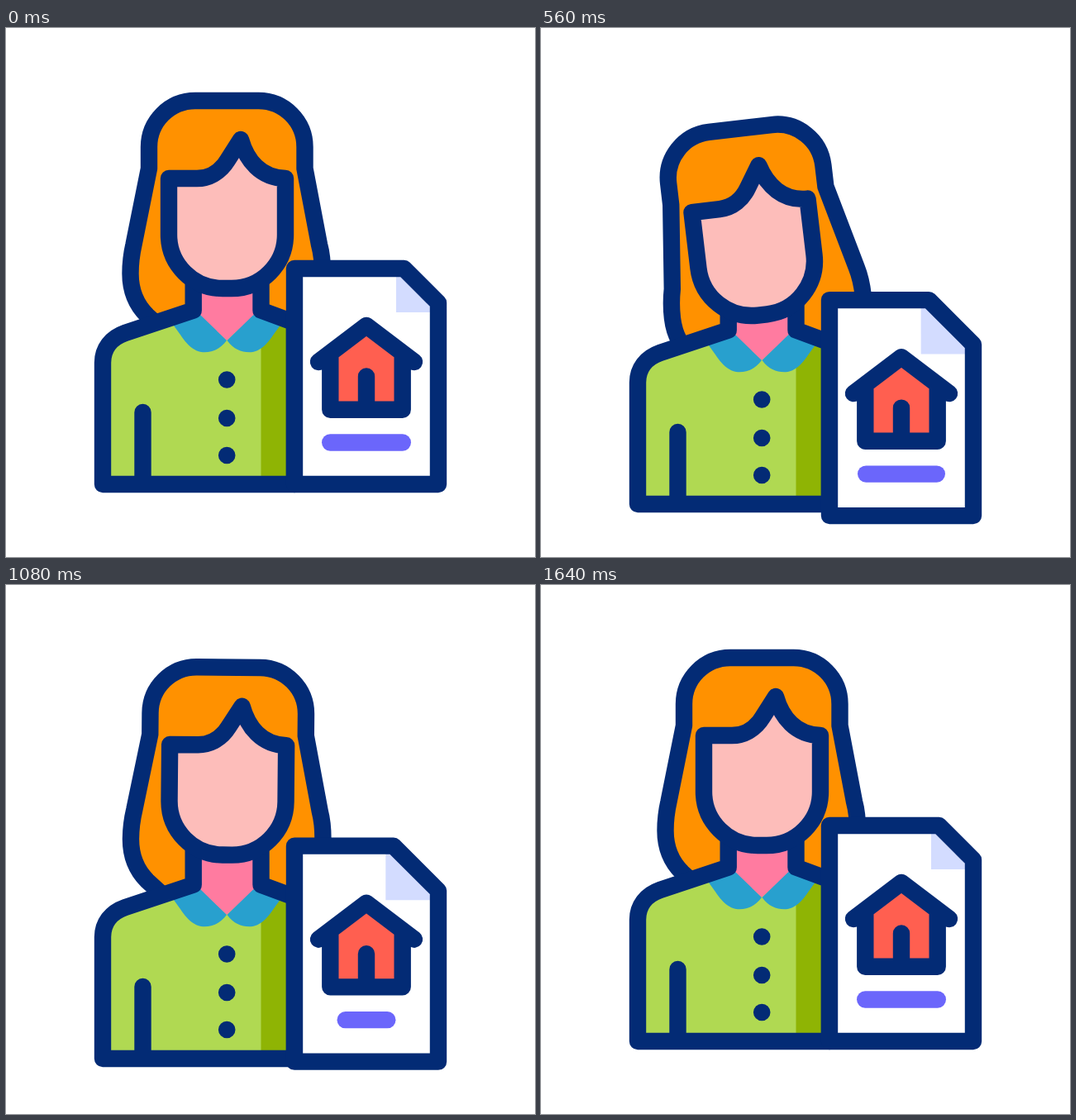
Write an HTML page that moves like this. It is 640 px wide and 640 px high and loops after 1680 ms.

```html
<!DOCTYPE html>
<html lang="en">
<head>
<meta charset="utf-8">
<title>Real estate agent</title>
<style>
  html, body { margin: 0; width: 100%; height: 100%; overflow: hidden; background: #fff; }
  svg { display: block; width: 100%; height: 100%; }
  .line { stroke: #032b75; stroke-width: 20.4; stroke-linecap: round; stroke-linejoin: round; }
</style>
</head>
<body>
<svg viewBox="0 0 640 640" fill="none">
  <g id="head-back">
    <path id="hair" class="line" fill="#ff9100"/>
  </g>

  <g id="body">
    <path fill="#ff7ba0" d="M227 285H308V341L267 382L227 341Z"/>
    <path fill="#b0d952" d="M117 552V405Q117 378 144 369L227 341L267 378L308 341L349 356V552Z"/>
    <path fill="#8fb404" d="M308.5 341L349 356V552H308.5Z"/>
    <g fill="#28a0ce">
      <path id="collar" d="M202 359L235 347L267 378C258 390 248 393 236 392C220 389 212 371 202 359Z"/>
      <use href="#collar" transform="matrix(-1 0 0 1 534.5 0)"/>
    </g>
    <path class="line" d="M226.7 285V341.5L144 369C127 375 117 388 117 405V552H349V356.5L308.5 341.5V285M165.5 465V552"/>
    <path stroke="#032b75" stroke-width="20.6" stroke-linecap="round" d="M267.2 425.5h0M267.2 472h0M267.2 517h0"/>
  </g>

  <path id="face" class="line" fill="#fdbdba"
    d="M197 182H231C247 182 260 173 268 160L284 135C291 160 308 181.500 338 182V250A65 65 0 0 1 273 315H262A65 65 0 0 1 197 250Z"/>

  <g id="doc">
    <path id="sheet" fill="#fff"/>
    <path id="fold" fill="#d3dcff"/>
    <path id="edge" class="line"/>
    <path fill="#ff5f50" d="M392 394L436 360L480 394V461H392Z"/>
    <path class="line" d="M378 404L436 360L494 404M392.3 396V461.7H479.7V396M436 421.5V461"/>
    <path id="bar" stroke="#6b66fb" stroke-width="20.4" stroke-linecap="round"/>
  </g>
</svg>
<script>
const LOOP = 1680, STEP = 40, REST = 120;
const set = (id, name, value) => document.getElementById(id).setAttribute(name, value);

// Eased 0 to 1 between times a and b.
function ease(t, a, b) {
  const p = Math.min(1, Math.max(0, (t - a) / (b - a)));
  return p * p * (3 - 2 * p);
}

// Rises from a to b, holds, falls from c to d.
const pulse = (t, a, b, c, d) => ease(t, a, b) - ease(t, c, d);

// The crown is fixed; the lower locks shift by (dx, dy).
function hairPath(dx, dy) {
  const p = (x, y) => `${x + dx} ${y + dy} `;
  return 'M173 170V144A56 56 0 0 1 229 88H305.5A56 56 0 0 1 361.5 144V170' +
    `L${p(379, 262)}C${p(382, 273)}${p(383, 285)}${p(383, 297)}` +
    `Q${p(383, 329)}${p(363, 348)}L${p(334, 374)}H${200 + dx}L${p(171, 348)}` +
    `Q${p(150.5, 328)}${p(150.5, 297)}C${p(150.5, 285)}${p(152, 273)}${p(154.5, 262)}Z`;
}

function draw(t) {
  const body = 29.5 * pulse(t, 236, 683, 906, 1399);
  const doc = 45 * pulse(t, 147, 696, 804, 1394);
  const fold = 16 * pulse(t, 230, 708, 933, 1436);
  const half = 43.8 - 25 * pulse(t, 510, 925, 925, 1390);

  // The head dips and leans one way, then rebounds; the locks trail behind.
  const nod = 8.2 * pulse(t, 110, 540, 540, 810) - 10.5 * pulse(t, 540, 810, 1028, 1300);
  const tilt = 2.4 * pulse(t, 500, 800, 800, 1200) - 7.8 * pulse(t, 90, 400, 500, 800);
  const swing = 8.3 * pulse(t, 110, 510, 540, 790) - 2.2 * pulse(t, 540, 790, 980, 1310) +
    9.3 * pulse(t, 980, 1310, 1310, 1640);

  const head = `translate(0 ${body + nod}) rotate(${tilt} 267.5 310)`;
  set('hair', 'd', hairPath(swing, -1.4 * tilt));
  set('head-back', 'transform', head);
  set('face', 'transform', head);
  set('body', 'transform', `translate(0 ${body})`);
  set('doc', 'transform', `translate(0 ${doc})`);

  const cut = `H${481.5 - fold}L523 ${332.5 + fold}V`;
  const sheet = `M349 291${cut}552H349Z`;
  set('sheet', 'd', sheet);
  set('edge', 'd', sheet);
  set('fold', 'd', `M${472 - fold} 291${cut}${344 + fold}H${472 - fold}Z`);
  set('bar', 'd', `M${436 - half} 501.5h${2 * half}`);
}

const start = performance.now();
function tick() {
  const t = (performance.now() - start) % LOOP;
  draw(t < REST ? 0 : Math.floor(t / STEP) * STEP);
  requestAnimationFrame(tick);
}
tick();
</script>
</body>
</html>
```
